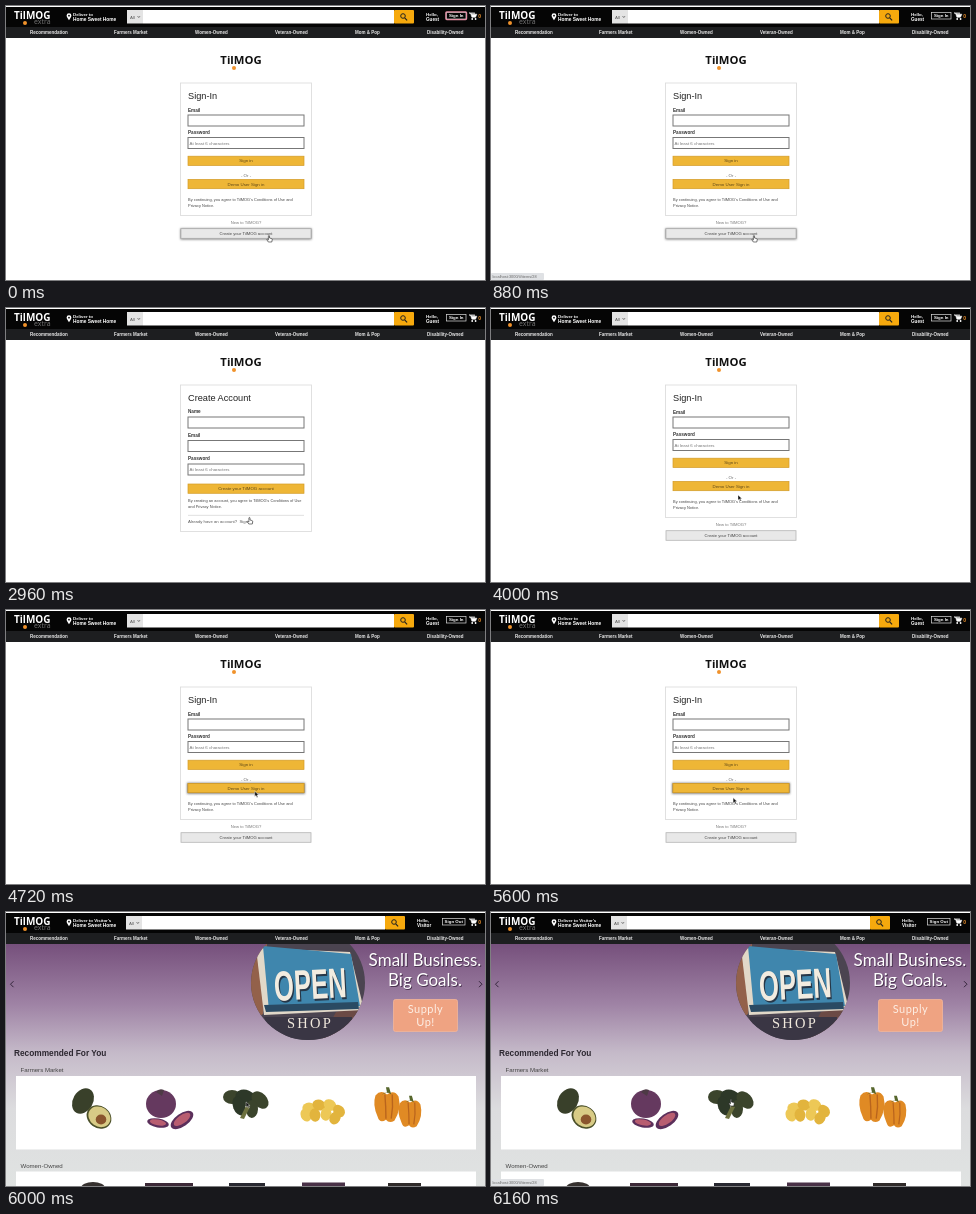
Animation, 479 px wide and 274 px high, one loop 6240 ms. Source, as an HTML page:

```html
<!DOCTYPE html>
<html lang="en">
<head>
<meta charset="utf-8">
<title>Shop sign-in</title>
<style>
html, body { margin: 0; width: 100%; height: 100%; overflow: hidden; background: #fff; }
svg { display: block; width: 100vw; height: 100vh; }
text { font-family: "Liberation Sans", Arial, sans-serif; white-space: pre; }
.brand { font-family: "Open Sans", sans-serif; font-weight: 700; }
.hero { font-family: Lato, sans-serif; }
.serif { font-family: "Liberation Serif", serif; }
</style>
</head>
<body>
<svg id="stage" viewBox="0 0 479 274" preserveAspectRatio="none">
  <defs>
    <linearGradient id="long" x2="0" y2="1">
      <stop stop-color="#7f5a84"/><stop offset=".28" stop-color="#a488a9"/>
      <stop offset=".55" stop-color="#c9bfce"/><stop offset=".72" stop-color="#dcdcdf"/><stop offset="1" stop-color="#e4e8e7"/>
    </linearGradient>
    <linearGradient id="short" x2="0" y2="1">
      <stop stop-color="#76507c"/><stop offset=".25" stop-color="#9f83a5"/>
      <stop offset=".45" stop-color="#c5bac9"/><stop offset=".68" stop-color="#dcdcde"/><stop offset="1" stop-color="#e0e3e2"/>
    </linearGradient>
    <clipPath id="disc"><circle cx="302" cy="71" r="57"/></clipPath>
    <clipPath id="below"><rect y="32" width="479" height="242"/></clipPath>
    <filter id="soft" x="-20%" y="-60%" width="140%" height="220%"><feGaussianBlur stdDeviation="1.2"/></filter>
  </defs>
</svg>
<script>
const BRAND = "TilMOG", USER = "Visitor";
const LOOP = 6240, STEP = 80;
const stage = document.getElementById("stage");

const attrs = o => Object.entries(o).map(([k, v]) => `${k}="${v}"`).join(" ");
const rect = (x, y, w, h, fill, o = {}) =>
  `<rect x="${x}" y="${y}" width="${w}" height="${h}" fill="${fill}" ${attrs(o)}/>`;
const path = (d, fill, o = {}) => `<path d="${d}" fill="${fill}" ${attrs(o)}/>`;
const oval = (x, y, rx, ry, fill, turn = 0, o = {}) =>
  `<ellipse rx="${rx}" ry="${ry}" fill="${fill}" transform="translate(${x} ${y}) rotate(${turn})" ${attrs(o)}/>`;
const text = (x, y, size, str, fill = "#333", o = {}) =>
  `<text x="${x}" y="${y}" font-size="${size}" fill="${fill}" ${attrs(o)}>${str}</text>`;
const BOLD = { "font-weight": 700 }, MID = { "text-anchor": "middle" };

function layer(html) {
  const g = document.createElementNS("http://www.w3.org/2000/svg", "g");
  g.innerHTML = html;
  stage.append(g);
  return g;
}
const show = (g, on) => g.setAttribute("display", on ? "inline" : "none");

// Header
const navItems = [[24, "Recommendation"], [108, "Farmers Market"], [189, "Women-Owned"],
  [269, "Veteran-Owned"], [349, "Mom &amp; Pop"], [421, "Disability-Owned"]];

function header(user) {
  const left = user ? 120 : 121, right = user ? 379 : 388, hello = user ? 411 : 420;
  const signX = user ? 436.5 : 440.5, signW = user ? 22.5 : 19.5;
  return rect(0, 1, 479, 21, "#050505") + rect(0, 21, 479, 11, "#1d1e20") +
    text(8, 13.3, 10, BRAND, "#fff", { class: "brand" }) +
    `<circle cx="19" cy="17" r="2" fill="#f0922b"/>` +
    text(28, 18.3, 7, "extra", "#777", { class: "brand", style: "font-weight:400" }) +
    path("M63 14.3C61.6 12 60.6 11 60.6 9.6a2.4 2.4 0 0 1 4.8 0C65.4 11 64.4 12 63 14.3Z", "#fff") +
    `<circle cx="63" cy="9.7" r=".9" fill="#050505"/>` +
    text(67, 9.6, 4.4, user ? `Deliver to ${user}'s` : "Deliver to", "#fff", BOLD) +
    text(67, 14.6, 4.8, "Home Sweet Home", "#fff", BOLD) +
    rect(left, 4, 16, 13.5, "#e4e4e4") + text(left + 3, 12.5, 4.4, "All", "#555") +
    path(`M${left + 10.5} 10l1.3 1.6 1.3-1.6`, "none", { stroke: "#555", "stroke-width": .7 }) +
    rect(left + 16, 4, right - left - 16, 13.5, "#fff") +
    rect(right, 4, 20, 13.5, "#f6a90d", { rx: 1 }) +
    `<circle cx="${right + 9}" cy="10" r="2.3" fill="none" stroke="#222"/>` +
    path(`M${right + 10.7} 11.8l2.4 2.5`, "none", { stroke: "#222", "stroke-width": 1.2 }) +
    text(hello, 9.8, 4.4, "Hello,", "#fff", BOLD) +
    text(hello, 14.6, 4.6, user || "Guest", "#fff", BOLD) +
    rect(signX, 6.5, signW, 6.5, "none", { stroke: "#ddd", "stroke-width": .7 }) +
    text(signX + signW / 2, 11.4, 4.4, user ? "Sign Out" : "Sign In", "#fff", { ...BOLD, ...MID }) +
    path("M463 7h1.5l1.4 4.2h3.6l1.3-3h-5.4l-.3-1H469z", "#fff", { stroke: "#fff", "stroke-width": .6 }) +
    `<circle cx="466.2" cy="13" r=".9" fill="#fff"/><circle cx="469.6" cy="13" r=".9" fill="#fff"/>` +
    text(472.3, 12, 5, "0", "#f0922b", BOLD) +
    navItems.map(([x, s]) => text(x, 28.4, 4.5, s, "#e8e8e8", BOLD)).join("");
}

// Account forms
const label = (y, s) => text(182, y, 4.65, s, "#333", BOLD);
const field = y => rect(182, y, 116, 11, "#fff", { stroke: "#777", "stroke-width": 1 });
const hint = y => text(183.5, y, 4.4, "At least 6 characters", "#777");
const gold = (y, s) => rect(182, y, 116, 9.3, "#eeb636", { stroke: "#d39b27", "stroke-width": .7 }) +
  text(240, y + 6.1, 4.4, s, "#5a4518", MID);
const card = (h, title) => text(235, 58.2, 11.3, BRAND, "#111", { class: "brand", ...MID }) +
  `<circle cx="228" cy="62" r="2" fill="#f0922b"/>` +
  rect(174.5, 77, 131, h, "#fff", { stroke: "#ddd", "stroke-width": .9 }) +
  text(182, 92.5, 9.2, title, "#222");
const shade = (x, y, w, h) => rect(x, y, w, h, "#555", { filter: "url(#soft)", opacity: .75 });
const createBtn = rect(175, 222.7, 130, 9.6, "#e8e8e8", { stroke: "#b5b5b5", "stroke-width": .8 }) +
  text(240, 229, 4.2, `Create your ${BRAND} account`, "#444", MID);
const demoBtn = gold(173.4, "Demo User Sign in");

const signIn = layer(card(132.5, "Sign-In") + label(106, "Email") + field(109) +
  label(128.2, "Password") + field(131.5) + hint(138.6) + gold(150.2, "Sign in") +
  text(240, 170.5, 4.4, "- Or -", "#666", MID) + demoBtn +
  text(182, 195.3, 3.95, `By continuing, you agree to ${BRAND}'s Conditions of Use and`, "#444") +
  text(182, 200.9, 3.95, "Privacy Notice.", "#444") +
  text(240, 217.6, 4.2, `New to ${BRAND}?`, "#777", MID) + createBtn);
const createHover = layer(shade(174.5, 222.5, 131, 11) + createBtn);
const demoHover = layer(shade(181, 172.8, 118, 11) + demoBtn);
const create = layer(card(146.5, "Create Account") + label(105.3, "Name") + field(109) +
  label(129, "Email") + field(132.5) + label(152.2, "Password") + field(156) + hint(163) +
  gold(176, `Create your ${BRAND} account`) +
  text(182, 194.3, 3.95, `By creating an account, you agree to ${BRAND}'s Conditions of Use`, "#444") +
  text(182, 200.2, 3.95, "and Privacy Notice.", "#444") +
  rect(182, 206.9, 116, .6, "#ccc") +
  text(182, 214.9, 4.25, "Already have an account?  Sign in", "#555"));

// Home page
const photo = `<g clip-path="url(#below)"><g clip-path="url(#disc)">` +
  rect(245, 14, 114, 114, "#4b4450") + path("M245 32h16l-4 70-12 8z", "#93614a") +
  path("M330 100l29-8v36h-44z", "#6b4a45") + path("M258 105h88v23h-80z", "#3a3644") +
  path("M250 36l94 4 14 58-100 5z", "#e1d8c8") + path("M257 34l88 8 9 52-91 5z", "#3f86ad") +
  path("M258 93l94-3 1 7-93 3z", "#2a4a63") +
  `<g transform="translate(305 87) rotate(-3) scale(.8 1.32)">` +
  text(1.5, 1.5, 32, "OPEN", "#263748", { ...BOLD, ...MID }) +
  text(0, 0, 32, "OPEN", "#f2ece0", { ...BOLD, ...MID }) + `</g>` +
  text(304, 115.5, 14.5, "SHOP", "#f0e8dc", { class: "serif", "letter-spacing": 2.2, ...MID }) + `</g></g>`;
const heroLine = (y, s) => [["#4a3450", .9], ["#fff", 0]].map(([c, d]) =>
  text(419 + d, y + d, 17, s, c, { class: "hero", ...MID })).join("");
const chevron = (x, dx) => path(`M${x} 69.2l${dx} 3 ${-dx} 3`, "none", { stroke: "#33243a", "stroke-width": 1 });
const hero = photo + heroLine(53.8, "Small Business.") + heroLine(74.2, "Big Goals.") +
  rect(387.5, 87.5, 64, 32, "#efa382", { rx: 2, stroke: "#f3b598", "stroke-width": .8 }) +
  ["Supply", "Up!"].map((s, i) => text(419.5, 101.3 + i * 12.5, 11, s, "#fdeee4",
    { class: "hero", "letter-spacing": .5, ...MID })).join("") +
  chevron(7.5, -3) + chevron(473, 3);

const loading = layer(rect(0, 32, 479, 242, "url(#long)") + hero + `<g></g>`);
const petalBox = loading.lastElementChild;

const avocado = oval(77, 189, 10, 13.5, "#39402a", 30) + oval(93, 205, 13, 11, "#4b5029", 35) +
  oval(93.4, 204.8, 11.6, 9.7, "#d8cb86", 35) + oval(95, 207.5, 5.3, 5, "#8a552d");
const figs = oval(155, 192, 15, 14, "#65395f") + path("M150 180q3-4 8-2l-2 6z", "#4d3a45") +
  [[152, 211, 11, 4.5, 10], [176, 208, 13, 6.5, -35]].map(([x, y, a, b, r]) =>
    oval(x, y, a, b, "#5b2f5b", r) + oval(x, y - .6, a * .75, b * .65, "#b85d70", r)).join("");
const kale = [[226, 185, 9, 7], [240, 186, 11, 8], [254, 188, 10, 7], [233, 194, 10, 6], [246, 197, 9, 6]]
  .map(([x, y, a, b], i) => oval(x, y, a, b, i % 2 ? "#2d3828" : "#3b442c", i * 23)).join("") +
  path("M240 194l-6 12 4 1 6-12z", "#6d713f");
const grapes = [[303, 196], [313, 193], [324, 193], [333, 199], [300, 203], [309, 203], [320, 202], [329, 206]]
  .map(([x, y], i) => oval(x, y, 6.7, 5.4, i % 2 ? "#e2b43d" : "#edc856", i * 17)).join("");
const pepper = (x, y, s) => `<g transform="translate(${x} ${y}) scale(${s})">` +
  path("M-11-9Q-6-15 0-10Q7-15 11-8Q14 4 7 15Q2 18-1 14Q-7 18-9 11Q-14 0-11-9Z", "#e08a24") +
  path("M-2-10Q-1 2-1 13M5-10Q6 2 4 13", "none", { stroke: "#b9641d", "stroke-width": 1.3 }) +
  path("M-5-10Q0-14 4-10L2-17H-1L0-12Z", "#56662c") + `</g>`;
const jars = oval(87, 276, 12, 6, "#35302e") + rect(139, 271, 48, 4, "#3c2937") +
  rect(223, 271, 36, 4, "#282830") + rect(296, 270.5, 43, 4, "#493147") + rect(382, 271, 33, 4, "#2f2a29");
const home = layer(rect(0, 32, 479, 242, "url(#short)") + hero +
  text(8, 144.2, 8.3, "Recommended For You", "#2c2730", BOLD) +
  text(14.5, 160.4, 6.1, "Farmers Market", "#444") + rect(10, 164, 460, 73.5, "#fff") +
  avocado + figs + kale + grapes + pepper(381, 193, 1.05) + pepper(404, 200, .95) +
  text(14.5, 255.8, 6.1, "Women-Owned", "#444") + rect(10, 259.5, 460, 15, "#fff") + jars);

const guestBar = layer(header(""));
const focusRing = layer(rect(439.8, 5.8, 20.8, 7.8, "none", { stroke: "#e58fa5", "stroke-width": 1.2, rx: 1 }));
const userBar = layer(header(USER));
const status = layer(rect(0, 267, 53, 7, "#dfe1e4", { rx: 1 }) +
  text(1.5, 272, 3.9, "localhost:3000/#/items/28", "#666"));

const arrow = layer(path("M0 0v5.2l1.3-1.1.9 2 1-.4-.9-2h1.7z", "#111", { stroke: "#fff", "stroke-width": .4 }));
const hand = layer(path("M-.6-2.2q.6-.7 1.1 0V0l2.2.6q.7.3.5 1.2L2.8 4H-.7L-2.2 1.6q.2-.9 1-.2l.6.5z",
  "#fff", { stroke: "#222", "stroke-width": .6 }));

// time, x, y, hand?
const moves = [[0, 263, 232, 1], [960, 263, 232, 0], [1520, 273, 220, 0], [2160, 273, 220, 0],
  [2400, 308, 189, 0], [2560, 308, 189, 0], [2960, 243.5, 212, 1], [3280, 243.5, 212, 0],
  [3600, 243.5, 212, 0], [4000, 247, 187, 0], [4240, 247, 187, 0], [4560, 249, 181, 0],
  [6080, 240, 190, 1]];

// x, y, length, width, angle
const petals = [[131, 159, 4, 1, 70], [146, 145, 3, 1.2, 25], [140, 171, 6.5, 3, -35], [202, 160, 5.5, 2.5, 10],
  [176, 184, 3, 1, 10], [214, 188, 5.5, 2.2, 38], [209, 196, 4, 1.3, -50], [297, 222, 5, .8, 75],
  [309, 251, 7, 3, -38], [319, 190, 1.5, .6, 60], [158, 251, 2, .8, 20], [272, 261, 3, .8, 65]];

function drawPetals(dt) {
  petalBox.innerHTML = petals.map(([x, y, a, b, turn], i) => {
    const fall = dt * (.018 + .003 * a), sway = Math.sin(dt / 300 + i) - Math.sin(i);
    return oval(x + sway * 3, y + fall, a, b, "#dc9b70", turn + dt * .05,
      { stroke: "#754365", "stroke-width": .8 });
  }).join("");
}

function drawCursor(t) {
  let i = moves.length - 1;
  while (moves[i][0] > t) i--;
  const a = moves[i], b = moves[i + 1] || a;
  const p = b === a ? 0 : (t - a[0]) / (b[0] - a[0]), k = p * p * (3 - 2 * p);
  const pos = `translate(${a[1] + (b[1] - a[1]) * k} ${a[2] + (b[2] - a[2]) * k})`;
  for (const g of [arrow, hand]) g.setAttribute("transform", pos);
  show(arrow, !a[3]);
  show(hand, a[3]);
}

function draw(t) {
  const within = (a, b) => t >= a && t < b;
  const making = within(960, 3280), inside = t >= 5680;
  show(signIn, !making && !inside);
  show(create, making);
  show(createHover, t < 960);
  show(demoHover, within(4480, 5680));
  show(loading, within(5680, 6000));
  show(home, t >= 6000);
  show(guestBar, !inside);
  show(userBar, inside);
  show(focusRing, t < 880);
  show(status, within(480, 1120) || within(3200, 3360) || t >= 6080);
  if (within(5680, 6000)) drawPetals(t - 5680);
  drawCursor(t);
}

const start = performance.now();
let last = -1;
function tick(now) {
  const t = Math.floor((Math.max(0, now - start) % LOOP) / STEP) * STEP;
  if (t !== last) draw(last = t);
  requestAnimationFrame(tick);
}
draw(0);
requestAnimationFrame(tick);
</script>
</body>
</html>
```
